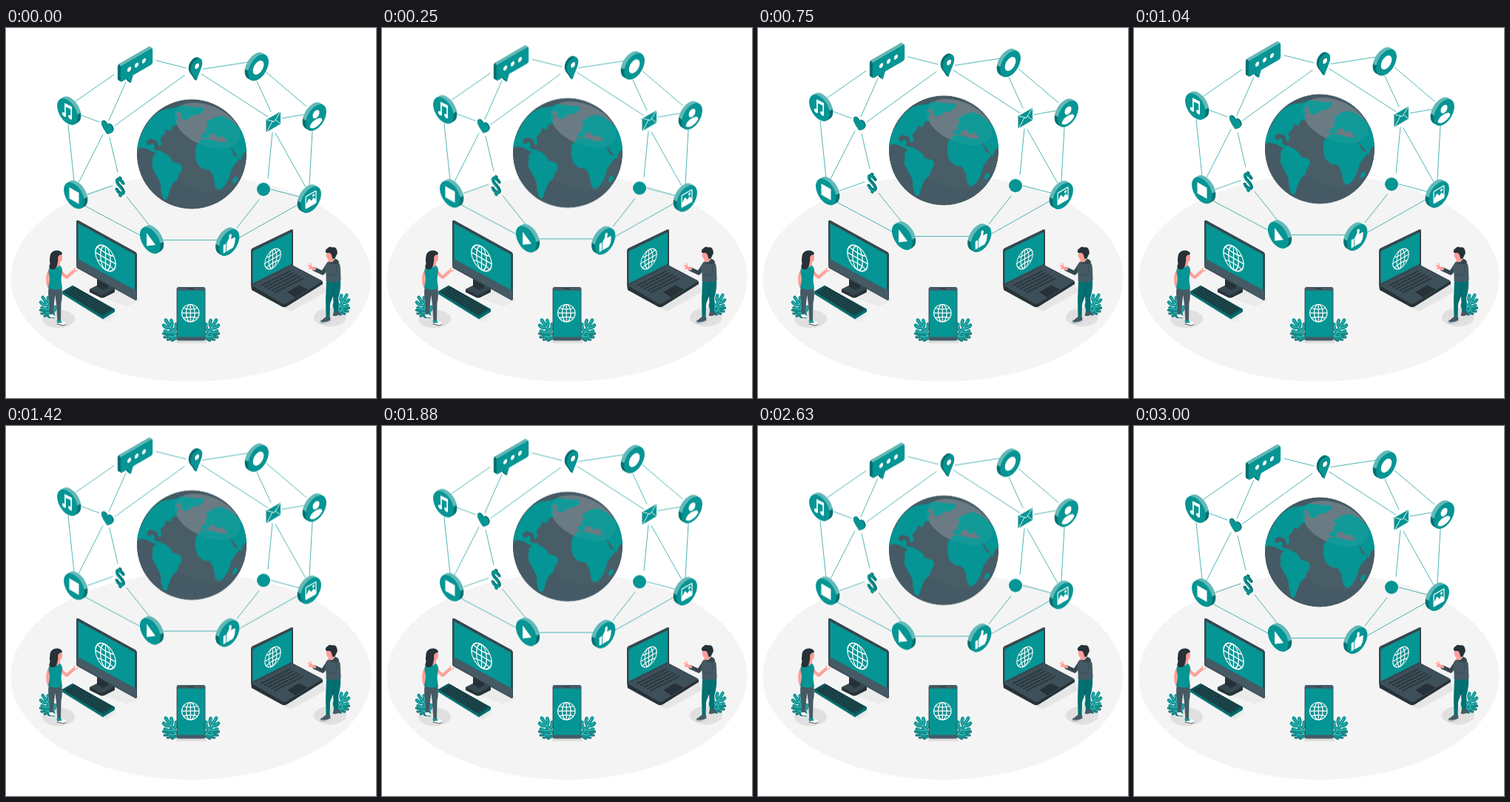
Recreate the animation shown at these times as an HTML page. Size 500 by 500 pixels, loop 3.04 s.

```html
<!DOCTYPE html>
<html lang="en">
<head>
<meta charset="utf-8">
<title>Connected world</title>
<style>
html, body { margin: 0; width: 100%; height: 100%; overflow: hidden; background: #fff; }
svg { display: block; width: 100%; height: 100%; }
</style>
</head>
<body>
<svg id="stage" viewBox="0 0 500 500">
  <defs>
    <linearGradient id="rim" x1="0" y1="0" x2="0" y2="1">
      <stop offset=".4" stop-color="#62b9b8"/>
      <stop offset=".4" stop-color="#047071"/>
    </linearGradient>
    <clipPath id="ball"><circle cx="251" cy="170.5" r="74.2"/></clipPath>
    <clipPath id="face"><circle r="13"/></clipPath>
  </defs>
  <g id="ground"></g>
  <g id="float"></g>
</svg>
<script>
const TEAL = '#059594', DEEP = '#047071', LIGHT = '#62b9b8';
const SLATE = '#455a64', DARK = '#37474f', INK = '#263238', SKIN = '#ff9f97';

const shape = (d, fill, more = '') => `<path d="${d}" fill="${fill}" ${more}/>`;
const line = (d, color, width, more = '') =>
  `<path d="${d}" fill="none" stroke="${color}" stroke-width="${width}" stroke-linecap="round" stroke-linejoin="round" ${more}/>`;
const poly = (points, fill) => `<polygon points="${points}" fill="${fill}"/>`;
const ellipse = (x, y, rx, ry, fill, more = '') =>
  `<ellipse cx="${x}" cy="${y}" rx="${rx}" ry="${ry}" fill="${fill}" ${more}/>`;

// Isometric plane: side 1 slopes down to the right, -1 up to the right, 0 is flat.
const iso = (x, y, side, body) => {
  const m = side ? `.866 ${side * 0.5} 0 1` : '1 0 0 1';
  return `<g transform="matrix(${m} ${x} ${y})">${body}</g>`;
};

// Repeats a part backwards to give it thickness.
const extrude = (part, side, depth) => {
  let out = '';
  for (let i = 8; i > 0; i--) {
    const k = depth * i / 8;
    out += `<g transform="translate(${side * k} ${-k})">${part}</g>`;
  }
  return out;
};

const disc = (x, y, side, icon) => iso(x, y, side,
  extrude('<circle r="16" fill="url(#rim)"/>', side, 5.2) +
  `<circle r="16" fill="${TEAL}"/>` + icon);

const wire = (x, y, side, r, w) => {
  const a = r * 0.82, h = r * 0.57, c = r * 0.3;
  return iso(x, y, side, `<g fill="none" stroke="#fff" stroke-width="${w}">
    <circle r="${r}"/><ellipse rx="${r * 0.5}" ry="${r}"/>
    <path d="M0 ${-r}V${r}M${-r} 0H${r}M${-a} ${-h}Q0 ${-c} ${a} ${-h}M${-a} ${h}Q0 ${c} ${a} ${h}"/></g>`);
};

// A leaf of finger-like lobes around a curved spine.
const leaf = (x, y, turn, size, fill) => {
  const lobes = 'M0 0Q1-12 0-26M0-3Q-5-3-7-7M0-3Q5-3 7-7M0-9Q-6-10-8-15M0-9Q6-10 8-15' +
    'M0-15Q-5-17-5.500-22M0-15Q5-17 5.500-22';
  return `<g transform="translate(${x} ${y}) rotate(${turn}) scale(${size})">` +
    line(lobes, fill, 4.3) + line(lobes, '#9fd2d1', 0.5) + '</g>';
};

const plant = (x, y, side, size) =>
  leaf(x, y, side * 72, size * 0.75, DEEP) + leaf(x, y, side * 32, size * 1.1, TEAL);

const monitor = () =>
  poly('122,362 150,348 182,368 164,376', '#ebebeb') +
  shape('M113 353L128 345.500Q131 344 134 345.500L147 352V357L133 364Q130 365.500 127 364L113 357Z', INK) +
  shape('M113 353L128 345.500Q131 344 134 345.500L147 352L133 360Q130 361.500 127 360Z', DARK) +
  poly('123,330 138,338 138,351 131,354 123,349', INK) +
  shape('M95 262Q95 259 98 260L175 302.500Q177 304 177 306V366Q177 369 174 367.500L97 325Q95 324 95 322Z', DARK) +
  shape('M95.800 312L176 355V365Q176 367.500 174 366.500L98 324Q96 323 96 321Z', SLATE) +
  poly('97.500,264 174,306 174,354 97.500,312.500', TEAL) +
  wire(134.5, 311, 1, 15.7, 1.5);

const keyboard = () => {
  let keys = '';
  for (let i = 0; i < 5; i++) {
    const x = 80.5 + i * 2.9, y = 357.2 - i * 1.75;
    keys += line(`M${x} ${y}l51 30`, INK, 2, 'stroke-dasharray="3.6 .9" style="stroke-linecap:butt"');
  }
  return poly('82,364 148,386 138,397 129,394', '#ebebeb') +
    poly('76,356 90,348 147,380 147,383.5 131,393.500 76,359.500', DEEP) +
    poly('76,356 90,348 147,380 131,390', '#0b5558') + keys;
};

const phone = () =>
  poly('228,421 271,421 271,426 231,426', '#dedede') +
  plant(231, 419, -1, 1) + plant(269, 419, 1, 1) +
  `<rect x="230.500" y="350" width="39" height="72.500" rx="3" fill="${SLATE}"/>` +
  `<rect x="232" y="354.800" width="36.500" height="62.700" fill="${TEAL}"/>` +
  line('M246 352.500H253', INK, 1.2) +
  wire(249.3, 385.2, 0, 11.7, 1.2);

const laptop = () => {
  let keys = '';
  for (let i = 0; i < 5; i++)
    keys += line(`M${345 + i * 4.5} ${348 + i * 2.4}l39-19.5`, INK, 2,
      'stroke-dasharray="3 .8" style="stroke-linecap:butt"');
  return poly('340,360 428,346 432,357 385,383', '#e6e6e6') +
    shape('M331 347L388 321L426 341Q428 342 428 344V346L380 376Q376 378.500 372 376L332 354Z', INK) +
    shape('M332 348L388 321L426 341Q428 342 426 343.500L379 372Q376 374 373 372Z', '#3d4f58') +
    keys + poly('380,357 396,347.500 408,353.500 391,364', INK) +
    shape('M331 301Q331 298.500 333 297.500L385 272.500Q388 271 388 274V321L333 348Q331 349 331 346Z', DARK) +
    poly('333.500,301.500 386,276 386,319 333.500,345', TEAL) +
    wire(360.5, 312, -1, 12.4, 1.2);
};

const woman = () =>
  ellipse(71, 393, 22, 12.5, '#e0e0e0') + plant(64, 387, -1, 0.95) +
  line('M60 326Q53 337 58 350', SKIN, 4) +
  shape('M58 349H75Q77 361 74.500 372L74 396H69.500L68 374L66.500 361L65 372L63.500 388H59L58.500 371Q56 360 58 349Z', SLATE) +
  shape('M58 387H63.500L66 391Q65 393.500 60 392Z', '#fff') + line('M58.500 391.500L65.500 392', DEEP, 1) +
  shape('M68.500 395H74.500L81 398.500Q82 402 77 402L68 399Z', '#fff') +
  shape('M68.500 395H74L76 398L69 399Z', TEAL) + line('M69 400L77 402L81 400.500', INK, 0.8) +
  line('M73 326Q76 333 82 337L91 329', SKIN, 4) +
  line('M90 330L96.500 327.500M90 329.500L93 325', SKIN, 1.7) +
  shape('M66 313H73V325Q70 329 66 325Z', SKIN) +
  shape('M61 322Q67 326 73 321Q76.500 324 76 329L74.500 340L76 352Q66 356 57 351Q60 339 57.500 330Q57 324 61 322Z', TEAL) +
  ellipse(71.8, 310.5, 4.3, 6.2, SKIN) +
  shape('M76 306Q76 301 69 300.500Q61 300.500 59.500 308Q58.500 314 59.500 319Q57 323 60 325.500Q67 328 69 321Q70 316 70.500 313Q69.500 309 72 307Z', INK);

const man = () =>
  ellipse(438, 391, 22, 12.5, '#e0e0e0') + plant(446, 384, 1, 0.95) +
  shape('M433 340H452Q453 352 449 365L449 385H443L442 362L438 373L437.500 392H432.500L432 368Z', DEEP) +
  line('M443 347L441.800 363', '#035b5c', 0.8) +
  shape('M443 383H449.500L452 386Q447 391 441.500 388.500Z', SLATE) +
  shape('M432 390.500H438L438.500 396Q432 400.500 425 398.500Q423.500 396 427 394.500Z', SLATE) +
  line('M425 397.500Q432 399.500 438 395.500', '#fff', 1) +
  line('M436 319L428 331L417 326', DARK, 5.5) +
  line('M417 325.500L412 323.500', SKIN, 4) +
  line('M413 323.500L408.500 321M412 322L411.500 318.500M413 325L409 325', SKIN, 1.6) +
  shape('M433 318Q438 313 446 314Q452 317 452 326L452.500 341Q442 346 432.500 341.500Q433 333 431.500 328Q430.500 322 433 318Z', SLATE) +
  line('M446 320Q450 329 443 335L435 334', DARK, 0.9) +
  shape('M435 307H442V316Q437 318 435.500 315Z', SKIN) +
  ellipse(437, 307, 4.3, 5.8, SKIN) +
  shape('M433 304Q430 301 434 298Q437 294.500 441 296.500Q446 295.500 447 300Q449 304 446 308Q445 312 441.500 312.500L440 307L438 304Z', INK) +
  shape('M437 316Q444 318 444 311.500Q450 313 450 317Q445 321 437 318Z', DARK);

const globe = () => {
  const land = [
    // North and Central America
    'M176 165L180 151Q185 139 194 125Q204 113 216 110L230 108L232 113L229 117L233 121L229 126L232 130L225 132L222 139L216 136L214 143L208 149L210 157L207 160L204 152L196 149L190 152L190 157L194 159L198 156L201 159L199 163L204 166L211 167L208 170L198 167L191 163L182 161Z',
    // South America
    'M199 173L204 168L214 169L222 175L225 181L235 184Q239 187 237 192L233 198L231 205L225 210L221 219L217 231L213 231L210 221L209 209L203 198L198 188Z',
    // Greenland
    'M226 110L236 105L252 107L267 108L266 113L259 117L252 118L244 124L238 122L236 114Z',
    // Europe and Asia
    'M264 149L266 143L272 142L269 137L274 132L270 128L280 122L291 119L304 125L316 136L324 150L327 165L320 169L317 178L311 170L302 158L297 150L291 145L286 148L282 142L276 143L273 148Z',
    // Africa
    'M257 160L263 152L272 150L282 153L289 155L299 155L303 162L308 173L316 176L309 184L304 192L300 205L294 215L287 219L283 214L281 201L276 192L266 190L259 184L256 172Z',
    // Madagascar
    'M306 208L308 203L312 201L312 206L308 210Z'
  ].join('');
  const shine = opacity => ellipse(272, 132, 47, 27, '#fff', `opacity="${opacity}" transform="rotate(24 272 132)"`);
  return `<g clip-path="url(#ball)">` +
    ellipse(251, 170.5, 74.2, 74.2, SLATE) +
    ellipse(272, 162, 69, 58, '#fff', 'opacity=".02" transform="rotate(25 272 162)"') + shine(0.14) +
    shape(land, TEAL, `stroke="${TEAL}" stroke-width="1" stroke-linejoin="round"`) + shine(0.05) + '</g>';
};

const links =
  'M203 44L243 54M266 55.500L328 46M146 63L94 99M162 73L139 125M147 132L241 64M264 62L354 120' +
  'M339 72L358 113M352 60L406 106M373 122L402 117M102 118L126 127M84 131L92 207M131 144L97 211' +
  'M140 148L151 195M110 225L144 213M104 239L181 280M163 228L198 272M213 286.600L285 286.600M312 270L342 232' +
  'M314 284L394 239M358 218L396 228M354 203L360 141M364 142L405 215M414 139L410 212';

const bubble = () => {
  const box = fill => `<rect x="-25" y="-10.500" width="50" height="21.500" rx="2.500" fill="${fill}"/>` +
    shape('M-15 10H-5L-9 20Z', fill);
  const dots = [-11.5, 0, 11.5].map(x => `<circle cx="${x}" r="3" fill="#fff"/>`).join('');
  return iso(176.5, 50, -1,
    extrude(box(DEEP), -1, 4.6) +
    shape('M-27.500-15.100L-25-10.500H24L25-9V-10L20.400-15.100Z', LIGHT) + box(TEAL) + dots);
};

const pin = () => {
  const drop = fill => shape('M0 15C-3 7-9 2-9-5A9 9 0 0 1 9-5C9 2 3 7 0 15Z', fill);
  return iso(257.5, 56.3, -1, extrude(drop(DEEP), -1, 3.5) + drop(TEAL) +
    `<circle cy="-5" r="4.300" fill="${DEEP}"/><circle cx=".6" cy="-4.500" r="3.500" fill="#fff"/>`);
};

const heart = () => {
  const form = fill => shape('M0 8C-4 5-9 1-9-3C-9-8-2-9 0-4C2-9 9-8 9-3C9 1 4 5 0 8Z', fill);
  return iso(136.7, 135.5, 1, extrude(form(DEEP), 1, 1.2) + form(TEAL));
};

const dollar = () => {
  const form = c => line('M5-6C4-10-5-10-5-5C-5 0 5-1 5 4.500C5 10-5 10-5.500 5M0-13V-9M0 9V13', c, 3.1, 'style="stroke-linecap:butt"');
  return iso(153.5, 215, 1, extrude(form(DEEP), 1, 1.8) + form(TEAL));
};

const letter = () =>
  poly('351.500,123 352.800,124 352.800,140.500 351.500,139.500', DEEP) +
  poly('352.500,123.500 371,113 371,129.500 352.500,140.500', TEAL) +
  line('M353 124L362.500 126.500L370.500 114M353 139.500L360 126M364.500 124.500L370.500 129', '#fff', 0.9);

const note = line('M-3.500 6V-8L6-9V5', '#fff', 2) + shape('M-4.500-9.500L7-10V-6L-4.500-5Z', '#fff') +
  ellipse(-5.2, 6.5, 3, 2.6, '#fff') + ellipse(4.2, 5.5, 3, 2.6, '#fff');
const square = '<rect x="-7.500" y="-7.500" width="15" height="15" fill="#fff"/>';
const dot = '<circle r="8.500" fill="#fff"/>';
const play = shape('M-5-6.500L7.500 2L-5 9.500Z', '#fff', 'stroke="#fff" stroke-width="1" stroke-linejoin="round"');
const person = `<g clip-path="url(#face)"><circle cy="-4.500" r="5.200" fill="#fff"/>` +
  shape('M-10 11C-10 4-6 2.500 0 2.500S10 4 10 11Q0 15-10 11Z', '#fff') + '</g>';
const picture = '<rect x="-8" y="-8" width="16" height="16" rx="1" fill="none" stroke="#fff" stroke-width="1.400"/>' +
  shape('M-8 7V3L-3-3L1 2L4-1L8 4V8H-8Z', '#fff') + '<circle cx="4" cy="-4" r="1.700" fill="#fff"/>';
const thumb = shape('M-9-1H-5V10H-9Z', '#fff') +
  shape('M-4-1L0-6V-10Q3-12 4-8L3-3H8Q11-2 9 1Q10 3 8.500 5Q9 7 7 8Q7 10 5 10H-4Z', '#fff');

document.getElementById('ground').innerHTML =
  ellipse(250, 338, 243.5, 140, '#f4f4f4') +
  monitor() + keyboard() + laptop() + phone() + woman() + man();

const float = document.getElementById('float');
float.innerHTML = globe() + line(links, TEAL, 0.7) +
  bubble() + pin() + heart() + dollar() + letter() +
  ellipse(348, 218, 9, 9, TEAL) +
  disc(83, 113, 1, note) + disc(92, 226.5, 1, square) + disc(194.8, 287, 1, play) +
  disc(341, 53.5, -1, dot) + disc(419, 121, -1, person) +
  disc(412, 232, -1, picture) + disc(301.5, 290, -1, thumb);

// Rises and sinks at 24 steps a second; the lead keeps each step on its 10 ms tick.
const LOOP = 3040, LEAD = 9;
const steps = [[0, 0], [1500, -10], [3000, 0], [LOOP, 0]];
float.animate(
  steps.map(([ms, y]) => ({ offset: ms / LOOP, transform: `translateY(${y}px)`, easing: 'steps(36)' })),
  { duration: LOOP, iterations: Infinity, delay: -LEAD });
</script>
</body>
</html>
```
